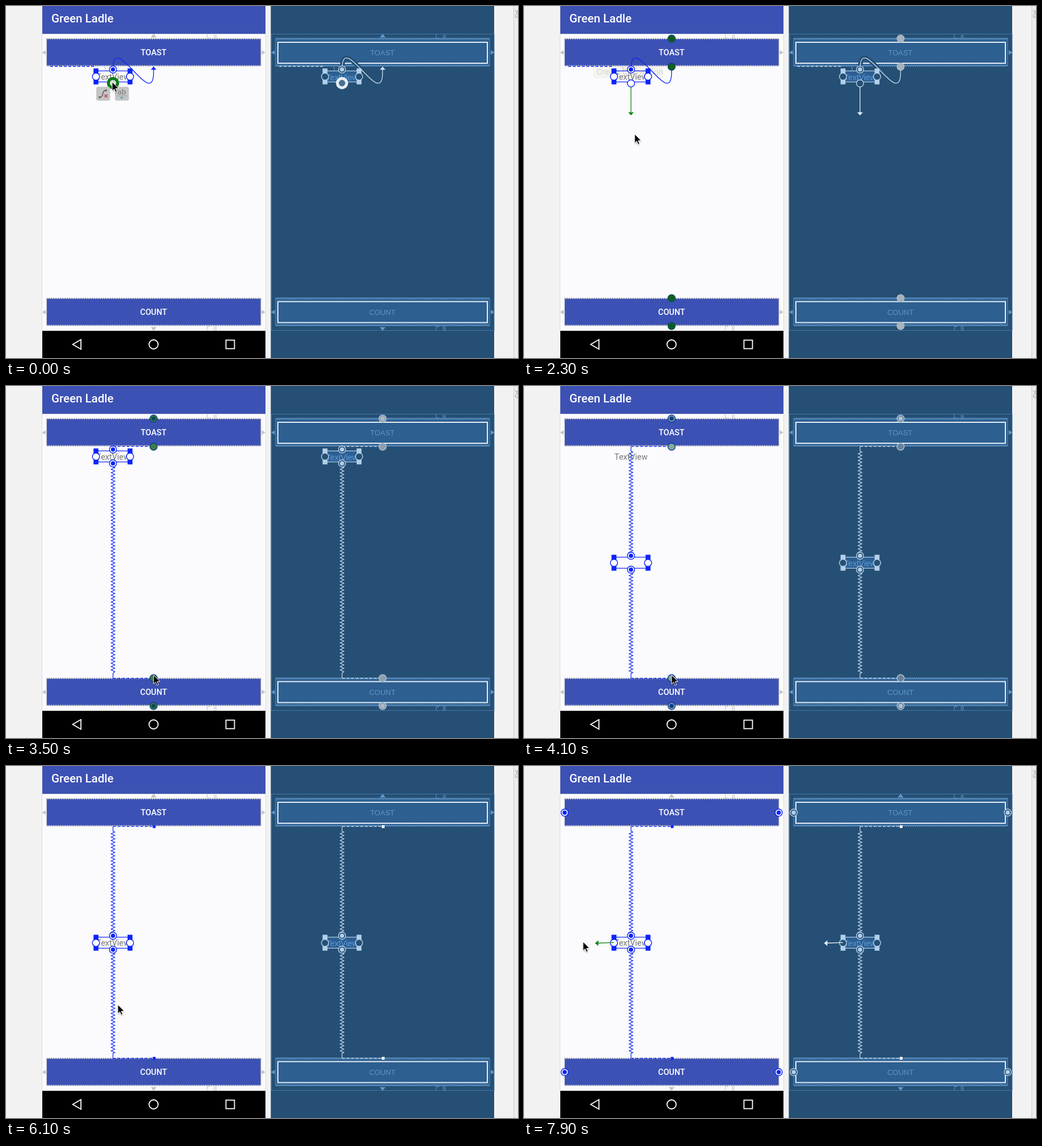
Animation of 902 by 621 pixels, one loop 8 s. Source, as an HTML page with a canvas:

```html
<!DOCTYPE html>
<html lang="en">
<head>
<meta charset="utf-8">
<title>Layout editor</title>
<style>
html, body { margin: 0; width: 100%; height: 100%; overflow: hidden; background: #f2f2f3; }
canvas { display: block; width: 902px; height: 621px; }
</style>
</head>
<body>
<canvas id="stage"></canvas>
<script>
const canvas = document.getElementById('stage');
const c = canvas.getContext('2d');
const W = 902, H = 621, LOOP = 8000, STEP = 100;
const dpr = window.devicePixelRatio || 1;
canvas.width = W * dpr;
canvas.height = H * dpr;

const CX = 260, TX = 188.5;
const app = {
  blue: false, sel: '#0b24fb', line: '#0b24fb', arrow: '#138a13', hint: '#c2c2c2',
  fill: '#ffffff', pulse: '#0d5a1c', ring: '#0b7a14', glow: '#0b7a14'
};
const plan = {
  blue: true, sel: '#b3cfea', line: '#cbdef0', arrow: '#e6eff7', hint: '#6098cc',
  fill: '#254f74', pulse: '#aab3ba', ring: '#e6eef5', glow: '#e6eef5'
};

// Pointer: time, x, y
const pointer = [
  [0, 187, 134], [400, 186, 138], [900, 185.5, 136], [2000, 186, 137], [2300, 195, 226],
  [2600, 225, 330], [2900, 238.5, 426.5], [3300, 260, 510], [6000, 260, 510], [6100, 197, 421],
  [6400, 157, 313], [7400, 157, 313], [7600, 143, 312], [7900, 104, 310]
];
// Loose end of the dragged connection
const pull = [
  [2000, 188.5, 142], [2300, 188.5, 193], [2600, 213, 293], [2900, 239.5, 388], [3400, 260, 500]
];
const pullLeft = [[7400, 157, 311.5], [7600, 149, 312], [7900, 125, 312.5]];

function along(keys, t) {
  if (t <= keys[0][0]) return keys[0].slice(1);
  for (let i = 1; i < keys.length; i++) {
    const [t0, x0, y0] = keys[i - 1], [t1, x1, y1] = keys[i];
    if (t <= t1) {
      const k = (t - t0) / (t1 - t0);
      return [x0 + (x1 - x0) * k, y0 + (y1 - y0) * k];
    }
  }
  return keys[keys.length - 1].slice(1);
}
const clamp = v => Math.max(0, Math.min(1, v));
const smooth = v => (v = clamp(v), v * v * (3 - 2 * v));

function rect(x, y, w, h, color) {
  c.fillStyle = color;
  c.fillRect(x, y, w, h);
}
function poly(color, width, points, close) {
  c.beginPath();
  points.forEach(p => c.lineTo(p[0], p[1]));
  if (close) c.closePath();
  c.strokeStyle = color;
  c.lineWidth = width;
  c.stroke();
}
function dash(color, x0, x1, y) {
  c.setLineDash([5, 3]);
  poly(color, 1.3, [[x0, y], [x1, y]]);
  c.setLineDash([]);
}
function disc(x, y, r, fill, stroke, width = 1.4) {
  c.beginPath();
  c.arc(x, y, r, 0, 7);
  if (fill) { c.fillStyle = fill; c.fill(); }
  if (stroke) { c.strokeStyle = stroke; c.lineWidth = width; c.stroke(); }
}
function text(s, x, y, font, color, align = 'center') {
  c.font = font;
  c.fillStyle = color;
  c.textAlign = align;
  c.fillText(s, x, y);
}
// Triangle with its tip at x, y, pointing along dx, dy
function tri(x, y, dx, dy, color, len = 6, half = 5) {
  const bx = x - dx * len, by = y - dy * len;
  c.beginPath();
  c.moveTo(x, y);
  c.lineTo(bx - dy * half, by + dx * half);
  c.lineTo(bx + dy * half, by - dx * half);
  c.fillStyle = color;
  c.fill();
}
function anchor(p, x, y, dot, pulse = 0) {
  disc(x, y, 6.3, p.fill, p.sel);
  if (dot) disc(x, y, 3.8, p.sel);
  if (pulse) {
    c.globalAlpha = pulse;
    disc(x, y, 6.6, p.pulse);
    c.globalAlpha = 1;
  }
}
function zigzagH(color, x0, x1, y, amp) {
  const points = [];
  for (let x = x0, i = 0; x <= x1; x += 2, i++) points.push([x, y + (i % 2 ? amp : -amp)]);
  poly(color, 1, points);
}
function spring(color, y0, y1, lead, tail) {
  const points = [[TX, y0], [TX, y0 + lead]], end = y1 - tail;
  for (let y = y0 + lead + 1.5, i = 0; y < end; y += 3, i++) points.push([TX + (i % 2 ? -3.2 : 3.2), y]);
  points.push([TX, end], [TX, y1]);
  poly(color, 1.2, points);
}

function button(p, y, label, frameY) {
  const mid = y + 25;
  if (p.blue) {
    rect(71.5, y, 377, 49, '#2d5f90');
    c.strokeStyle = '#5488b8';
    c.lineWidth = 1;
    c.strokeRect(71.5, y, 377, 49);
    zigzagH('#6a9ccb', 72, 449, y + 1, 1.7);
    zigzagH('#6a9ccb', 72, 449, y + 48, 1.7);
    c.strokeStyle = '#e4ecf4';
    c.lineWidth = 2;
    c.strokeRect(75.5, frameY, 369, 37);
    text(label, 259.5, mid + 5, '13px "Liberation Sans", sans-serif', '#5f96cb');
  } else {
    rect(72, y + 1, 377, 47.5, '#3c51b4');
    poly('#b9bcc8', 1, [[71.5, y], [71.5, y + 49]]);
    poly('#b9bcc8', 1, [[449, y], [449, y + 49]]);
    zigzagH('#a9adbd', 72, 449, y + 0.8, 1.3);
    zigzagH('#a9adbd', 72, 449, y + 48.4, 1.3);
    text(label, CX, mid + 5, '500 14.4px Roboto, sans-serif', '#ffffff');
  }
}

function margins(p) {
  const font = '11px "Liberation Sans", sans-serif';
  poly(p.hint, 1, [[354.5, 50], [354.5, 56.5], [360, 56.5]]);
  text('8', 368.5, 58.5, font, p.hint);
  poly(p.hint, 1, [[360, 565.5], [354.5, 565.5], [354.5, 572]]);
  text('8', 368.5, 573, font, p.hint);
}

function backdrop() {
  rect(0, 0, W, H, '#f2f2f3');
  rect(894, 0, 1.5, H, '#cfcfd1');
  rect(895.5, 0, 7, H, '#ececee');
  c.save();
  c.translate(904, 21);
  c.rotate(-Math.PI / 2);
  text('Col', 0, 0, '9px Roboto, sans-serif', '#8a8a8a', 'left');
  c.restore();

  rect(63, 0, 395, H, '#dcdcde');
  rect(64, 0, 393, H, '#fbfbfd');
  rect(64, 0, 393, 49, '#3c51b4');
  rect(64, 49, 393, 1, '#d8d9de');
  text('Green Ladle', 80, 28.5, '500 20.5px Roboto, sans-serif', '#ffffff', 'left');
  rect(64, 573, 393, 48, '#000000');
  poly('#ffffff', 1.8, [[117.5, 597], [132, 588.5], [132, 605.5]], true);
  disc(260, 597, 8, null, '#ffffff', 1.8);
  c.strokeRect(387.5, 589.5, 15, 15);

  rect(466.5, 0, 393.5, H, '#254f74');
  c.strokeStyle = '#4478a6';
  c.lineWidth = 1;
  c.strokeRect(467.5, 49.5, 392.5, 523);
}

function hover(p, x, y, v) {
  disc(x, y, 6, p.fill);
  c.globalAlpha = v;
  disc(x, y, 6, p.glow);
  c.globalAlpha = 1;
  disc(x, y, 8.2, null, p.ring, 5);
}

function actions() {
  for (const x of [159, 192]) {
    c.beginPath();
    c.roundRect(x, 142.5, 24.5, 24.5, 3.5);
    c.fillStyle = '#c5c5c5';
    c.fill();
  }
  c.beginPath();
  c.moveTo(165, 161);
  c.bezierCurveTo(174, 161, 167, 149, 176, 149);
  c.strokeStyle = '#6a6a6a';
  c.lineWidth = 1.8;
  c.stroke();
  disc(165, 161, 1.9, '#6a6a6a');
  disc(176, 149, 1.9, '#6a6a6a');
  poly('#c03a52', 1.5, [[173.5, 156], [179, 161.5]]);
  poly('#c03a52', 1.5, [[179, 156], [173.5, 161.5]]);
  text('ab', 204, 156, '13px Roboto, sans-serif', '#757575');
  c.setLineDash([2, 1.5]);
  poly('#8a8a8a', 1, [[196, 158.5], [213, 158.5]]);
  c.setLineDash([]);
  tri(204, 159.8, 0, -1, '#1e96d4', 3, 3);
}

function tooltip(alpha) {
  c.globalAlpha = alpha;
  rect(122, 106, 123.5, 21.5, '#d3d3c4');
  rect(122.5, 106.5, 122.5, 20.5, '#f5f5e2');
  text('Create Connection', 128, 121, '13.2px Inter, sans-serif', '#3a3a3a', 'left');
  c.globalAlpha = 1;
}

function wire(p) {
  const path = () => {
    c.beginPath();
    c.moveTo(TX, 112);
    c.bezierCurveTo(TX, 40, CX, 188, CX, 116);
    c.lineTo(CX, 107);
  };
  if (p.blue) {
    c.save();
    c.beginPath();
    c.rect(180, 80, 56, 40);
    c.clip();
    path();
    c.strokeStyle = p.fill;
    c.lineWidth = 8;
    c.stroke();
    c.restore();
  }
  path();
  c.strokeStyle = p.line;
  c.lineWidth = 1.3;
  c.stroke();
}

function widget(p, s) {
  const y = s.y, L = 158.5, R = 218.5, top = y - 10, bot = y + 9.5;
  if (p.blue) {
    rect(L, top, R - L, bot - top, '#2d5f92');
    text('TextView', TX, y + 6, '14px "Liberation Sans", sans-serif', '#5f9bd6');
  } else {
    text('TextView', TX, s.textY + 5, '14.4px Roboto, sans-serif', '#767676');
  }
  c.strokeStyle = p.sel;
  c.lineWidth = 1.2;
  c.strokeRect(L, top, R - L, bot - top);
  for (const x of [L, R]) for (const cy of [top, bot]) rect(x - 4.3, cy - 4.3, 8.6, 8.6, p.sel);
  anchor(p, L, y, false);
  anchor(p, R, y, false);
  anchor(p, TX, y - 12.5, true);
  anchor(p, TX, y + 12, s.linked);
}

function scene(p, s) {
  const { t, v } = s;
  margins(p);
  if (!s.dragDown) {
    tri(CX, 49, 0, -1, p.hint, 6.5);
    tri(CX, 573, 0, 1, p.hint, 6.5);
  }
  if (!s.dragLeft) for (const y of [82, 540]) {
    tri(63.5, y, -1, 0, p.hint, 6.5, 4);
    tri(457, y, 1, 0, p.hint, 6.5, 4);
  }
  button(p, 57, 'TOAST', 64);
  button(p, 515, 'COUNT', 521.5);

  if (!p.blue && t >= 2100 && t < 2500) tooltip(0.12 + 0.2 * clamp((2400 - t) / 300));

  if (s.linked) {
    dash(p.line, TX, CX, 106.7);
    dash(p.line, TX, CX, 515.7);
    spring(p.line, 107, s.y - 18, 8, 0);
    spring(p.line, s.y + 18, 515, 0, 8);
  } else {
    dash(p.line, 78, 155, 106.5);
    poly(p.hint, 1, [[172, 108.5], [175, 108.5], [175, 115]]);
    wire(p);
    if (!s.dragDown) tri(CX, 107, 0, -1, p.line, 5.5);
  }

  if (s.dragDown) {
    anchor(p, CX, 57.5, true, v);
    anchor(p, CX, 107, false, v);
    anchor(p, CX, 515.5, false, v);
    anchor(p, CX, 564.5, true, v);
  } else if (s.linked) {
    for (const y of [107, 515.7]) rect(CX - 1.5, y - 2.5, 5, 5, p.blue ? '#f2f7fb' : p.sel);
  }
  if (s.dragLeft) {
    for (const x of [71.7, 448.7]) for (const y of [82.3, 540]) anchor(p, x, y, true, v);
  }

  widget(p, s);

  if (s.dragDown && !s.linked && t > 2000) {
    const [x, y] = along(pull, t), y0 = 143, d = (y - 5 - y0) * 0.06;
    c.beginPath();
    c.moveTo(TX, y0);
    c.bezierCurveTo(TX, y0 + d, x, y - 5 - d, x, y - 5);
    c.strokeStyle = p.arrow;
    c.lineWidth = 1.3;
    c.stroke();
    tri(x, y, 0, 1, p.arrow, 5.5);
  }
  if (s.dragLeft && t > 7400) {
    const [x, y] = along(pullLeft, t);
    poly(p.arrow, 1.3, [[158.5, 311.3], [x + 5, y]]);
    tri(x, y, -1, 0, p.arrow);
  }
  if (t < 2000) hover(p, TX, 136, v);
  if (t >= 6400 && t < 7400) hover(p, 158.5, 312, v);
  if (!p.blue && t < 2000) actions();
  if (!p.blue && t >= 1500 && t < 2100) tooltip(1);
}

function cursor(x, y) {
  c.save();
  c.translate(x, y);
  c.beginPath();
  [[0, 0], [0, 15.8], [3.6, 12.4], [6, 18.2], [8.6, 17.1], [6.2, 11.5], [11.2, 11.3]]
    .forEach(q => c.lineTo(q[0], q[1]));
  c.closePath();
  c.shadowColor = 'rgba(0,0,0,.4)';
  c.shadowBlur = 3 * dpr;
  c.shadowOffsetY = 1.5 * dpr;
  c.fillStyle = '#000000';
  c.fill();
  c.shadowColor = 'transparent';
  c.strokeStyle = '#ffffff';
  c.lineWidth = 1;
  c.stroke();
  c.restore();
}

function draw(t) {
  const s = {
    t,
    v: 0.5 + 0.5 * Math.sin((t - 100) / 1000 * 2 * Math.PI),
    dragDown: t >= 2000 && t < 5100,
    dragLeft: t >= 7400,
    linked: t >= 3500,
    y: 124.5 + 187.5 * smooth((t - 3600) / 300),
    textY: t < 5300 ? 124.5 : 312
  };
  c.setTransform(dpr, 0, 0, dpr, 0, 0);
  c.lineJoin = 'miter';
  backdrop();
  scene(app, s);
  c.save();
  c.translate(403.5, 0);
  scene(plan, s);
  c.restore();
  cursor(...along(pointer, t));
}

const start = performance.now();
function tick() {
  const t = (performance.now() - start) % LOOP;
  draw(Math.floor(t / STEP) * STEP);
  requestAnimationFrame(tick);
}
tick();
</script>
</body>
</html>
```
